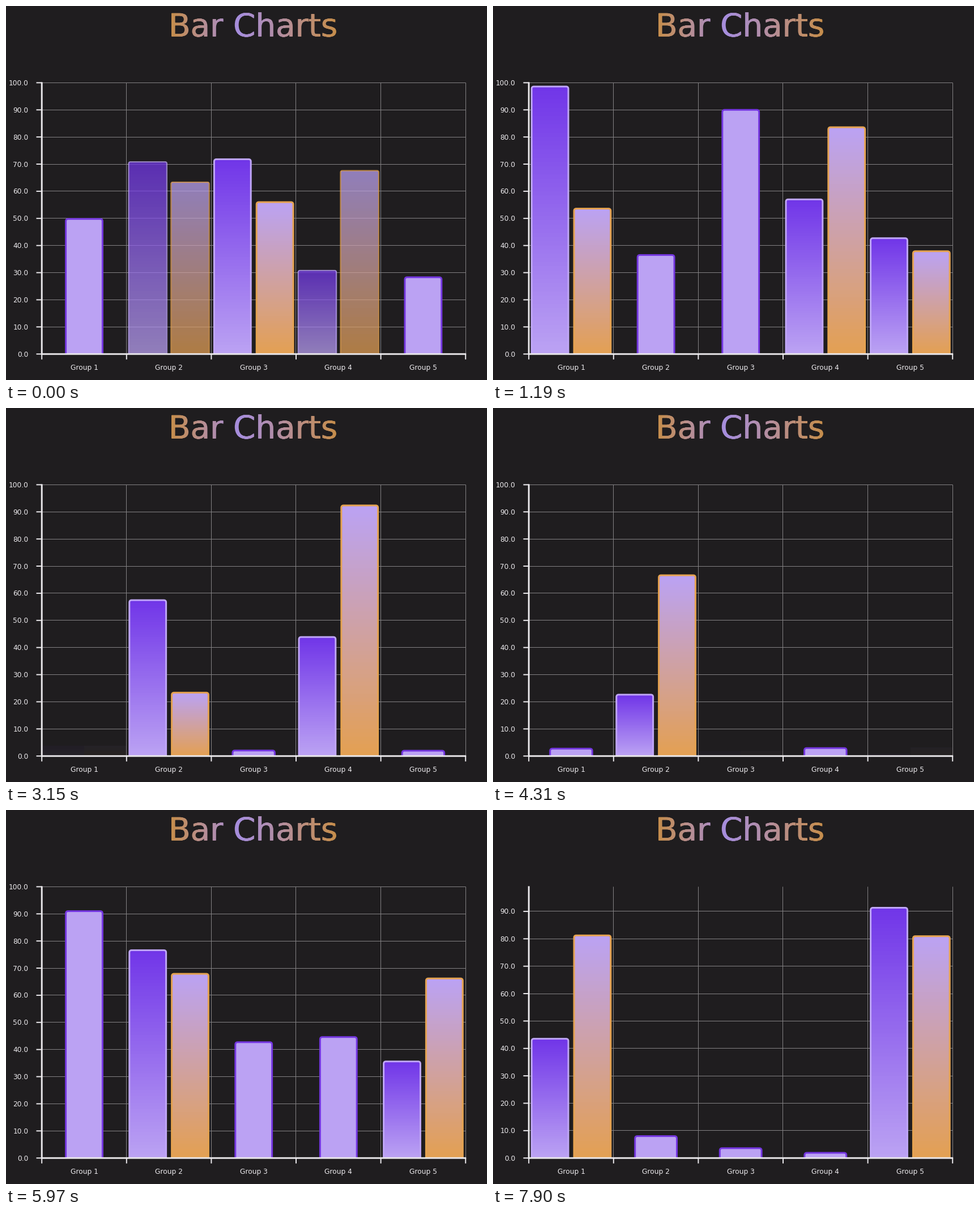
Animation of 849x660 px, one loop 7.99 s. Source, as a matplotlib script:

```python
import math
import random

import numpy as np
import matplotlib.pyplot as plt
from matplotlib.animation import FuncAnimation
from matplotlib.collections import LineCollection, PathCollection, PolyCollection
from matplotlib.colors import to_rgb
from matplotlib.path import Path
from matplotlib.textpath import TextPath
from matplotlib.transforms import Affine2D

W, H, DPI = 849, 660, 72  # at 72 dpi one point is one pixel
LOOP, FRAME = 7990, 17
MOVE, TICK = 490, 65  # length of a move and of one visible step, in ms
LEFT, RIGHT, TOP, BASE = 63.2, 811.2, 135.4, 614.2
GROUP = (RIGHT - LEFT) / 5
SLOT = GROUP / 2
INSET, STROKE, RADIUS, STRIPS = 5, 3, 4, 64

BG, INK, GRID = "#1f1d1f", "#ebe9ec", "#838183"
FONT = "DejaVu Sans"
VIOLET, LILAC, ORANGE = "#7136e8", "#bba2f3", "#e3a053"

# kind: (fill top, fill bottom, outline)
STYLES = {
    "single": (LILAC, LILAC, "#7436e0"),
    "first": (VIOLET, LILAC, "#bfa6f6"),
    "second": (LILAC, ORANGE, "#e5a250"),
}

# Each round: first visible step, time already run by then, and the groups.
# A group lists its bar values; a plain count stands for that many random bars.
ROUNDS = [
    (-15, 360, [[49.8], [96.4, 86.2], [71.8, 56], [41.9, 92], [28.3]]),
    (670, 20, [[98.6, 53.6], [36.5], [90], [57, 83.6], [42.7, 37.9]]),
    (1910, 50, [1, [58.9, 21.6], 2, [43.7, 94], 2]),
    (3150, 19, [[98, 99], [21.7, 67.2], 1, [48, 52], 1]),
    (4310, 16, [1, [50, 50], 2, 1, [30, 98]]),
    (5480, 36, [[91], [76.6, 67.9], [42.7], [44.6], [35.6, 66.2]]),
    (6690, 100, [[38.7, 83.6], [74.2, 44.9], [36.1, 39.7], [68.5, 87.5],
                 [91.7, 87.4]]),
    (7900, 49, [[87, 60], [80], [36], [19], [88, 23]]),
]


def mix(a, b, p):
    return a + (b - a) * p


def crisp(v):
    """Centre of the pixel that holds v."""
    return math.floor(v) + .5


def fill_in(groups, rng):
    return [[rng.uniform(50, 90) for _ in range(g)] if isinstance(g, int) else g
            for g in groups]


def axis_max(groups):
    return 10 * math.ceil(max(map(max, groups)) / 10)


rng = random.Random(3)
charts = [fill_in(groups, rng) for _, _, groups in ROUNDS]
# The opening move keeps all groups but the second and the fourth.
opening = [[95] if g in (1, 3) else bars for g, bars in enumerate(charts[0])]
charts.insert(0, opening)


def state(t):
    """Return the old chart, the new chart and the stepped progress."""
    i = max(k for k, (first, *_) in enumerate(ROUNDS) if first <= t)
    first, lead, _ = ROUNDS[i]
    elapsed = lead + TICK * ((t - first) // TICK)
    return charts[i], charts[i + 1], min(1, elapsed / MOVE)


def bars_at(old, new, p):
    """Yield centre, value, kind and growth of every bar."""
    for g, (before, after) in enumerate(zip(old, new)):
        middle = LEFT + GROUP * (g + .5)
        kept = len(before) == len(after)
        for j, value in enumerate(after):
            shown = mix(before[j], value, p) if kept else value * p
            if len(after) == 1:
                kind, cx = "single", middle
            else:
                kind, cx = ("first", "second")[j], middle + (j - .5) * SLOT
            yield cx, shown, kind, 1 if kept else p


def outline(x0, x1, y, r):
    """Open bar outline with rounded upper corners."""
    r = min(r, BASE - y)
    points = [(x0, BASE), (x0, y + r), (x0, y), (x0 + r, y),
              (x1 - r, y), (x1, y), (x1, y + r), (x1, BASE)]
    codes = [Path.MOVETO, Path.LINETO, Path.CURVE3, Path.CURVE3,
             Path.LINETO, Path.CURVE3, Path.CURVE3, Path.LINETO]
    return Path(points, codes)


def strips(x0, x1, y):
    """Thin horizontal quads that fill a bar from y to the base."""
    rows = np.linspace(min(y, BASE), BASE, STRIPS + 1)
    quads = np.empty((STRIPS, 4, 2))
    quads[:, [0, 3], 0] = x0
    quads[:, [1, 2], 0] = x1
    quads[:, :2, 1] = rows[:-1, None]
    quads[:, 2:, 1] = rows[1:, None]
    return quads


def shades(kind, alpha):
    top, bottom, _ = STYLES[kind]
    rgb = np.linspace(to_rgb(top), to_rgb(bottom), STRIPS)
    return np.column_stack([rgb, np.full(STRIPS, alpha)])


def draw_title():
    stops = np.array([(198, 141, 74), (166, 142, 222), (198, 141, 74)]) / 255
    xs = np.linspace(0, 1, 100)
    ramp = np.stack([np.interp(xs, [0, .41, 1], c) for c in stops.T], axis=1)
    image = ax.imshow(ramp[None], extent=(288, 586, 75, 5), aspect="auto",
                      interpolation="bilinear")
    glyphs = TextPath((0, 0), "Bar Charts", size=56.3, prop={"family": FONT})
    # Two shifted copies make the strokes a little heavier.
    heavy = Path.make_compound_path(
        *(glyphs.transformed(Affine2D().translate(dx, 0)) for dx in (-.5, .5)))
    place = Affine2D().scale(1, -1).translate(292.5 - glyphs.get_extents().x0, 53.8)
    image.set_clip_path(heavy, place + ax.transData)


def add_lines(segments, color, width, z):
    return ax.add_collection(LineCollection(
        segments, colors=color, linewidths=width, zorder=z, snap=False))


fig = plt.figure(figsize=(W / DPI, H / DPI), dpi=DPI, facecolor=BG)
ax = fig.add_axes([0, 0, 1, 1])
draw_title()
ax.set_xlim(0, W)
ax.set_ylim(H, 0)
ax.axis("off")

group_edges = [LEFT + GROUP * k for k in range(6)]
columns = [[(crisp(x), TOP), (crisp(x), BASE)] for x in group_edges[1:]]
feet = [[(x, BASE), (x, BASE + 9.5)] for x in group_edges]
grid = add_lines([], GRID, 1, 1)
ticks = add_lines([], INK, 2, 4)
add_lines([[(LEFT, TOP - 1), (LEFT, BASE + 1.5)],
           [(LEFT - 1, BASE), (RIGHT + 1, BASE)]], INK, 2.9, 5)
fills = ax.add_collection(PolyCollection([], edgecolors="none", linewidths=0,
                                         antialiaseds=False, zorder=2))
rims = ax.add_collection(PathCollection([], facecolors="none", zorder=3,
                                        snap=False))

text_style = dict(color=INK, family=FONT, va="baseline", fontsize=12.3)
for n in range(5):
    ax.text(LEFT + GROUP * (n + .5), 642, f"Group {n + 1}", ha="center",
            **text_style)
values = range(0, 101, 10)
labels = [ax.text(39.5, 0, f"{v:.1f}", ha="right", **text_style) for v in values]


def draw_axis(scale):
    rows = []
    for value, label in zip(values, labels):
        y = BASE - value * scale
        seen = y > TOP - 1
        label.set_y(y + 4.5)
        label.set_visible(seen)
        if seen:
            rows.append(y)
    grid.set_segments(columns + [[(LEFT, crisp(y)), (RIGHT, crisp(y))] for y in rows])
    ticks.set_segments(feet + [[(53.5, y), (LEFT, y)] for y in rows])


def draw_bars(bars, scale):
    quads, colors, paths, lines, widths = [], [], [], [], []
    for cx, value, kind, grow in bars:
        solid = 1 if kind == "single" else grow
        half = SLOT / 2 - INSET * grow
        top = BASE - value * scale
        width = STROKE * solid
        pad = width * .2
        quads.extend(strips(cx - half + pad, cx + half - pad, top + pad))
        colors.append(shades(kind, solid))
        paths.append(outline(cx - half, cx + half, top, RADIUS * solid))
        lines.append((*to_rgb(STYLES[kind][2]), solid))
        widths.append(width)
    fills.set_verts(quads)
    fills.set_facecolor(np.concatenate(colors))
    rims.set_paths(paths)
    rims.set_edgecolor(lines)
    rims.set_linewidth(widths)


def update(i):
    # Sample close to the end of the frame so that hard changes are not late.
    old, new, p = state(i * FRAME + 15)
    scale = (BASE - TOP) / mix(axis_max(old), axis_max(new), p)
    draw_axis(scale)
    draw_bars(bars_at(old, new, p), scale)
    return []


anim = FuncAnimation(fig, update, frames=LOOP // FRAME, interval=FRAME,
                     init_func=lambda: update(0), repeat=True, repeat_delay=0)
plt.show()
```
